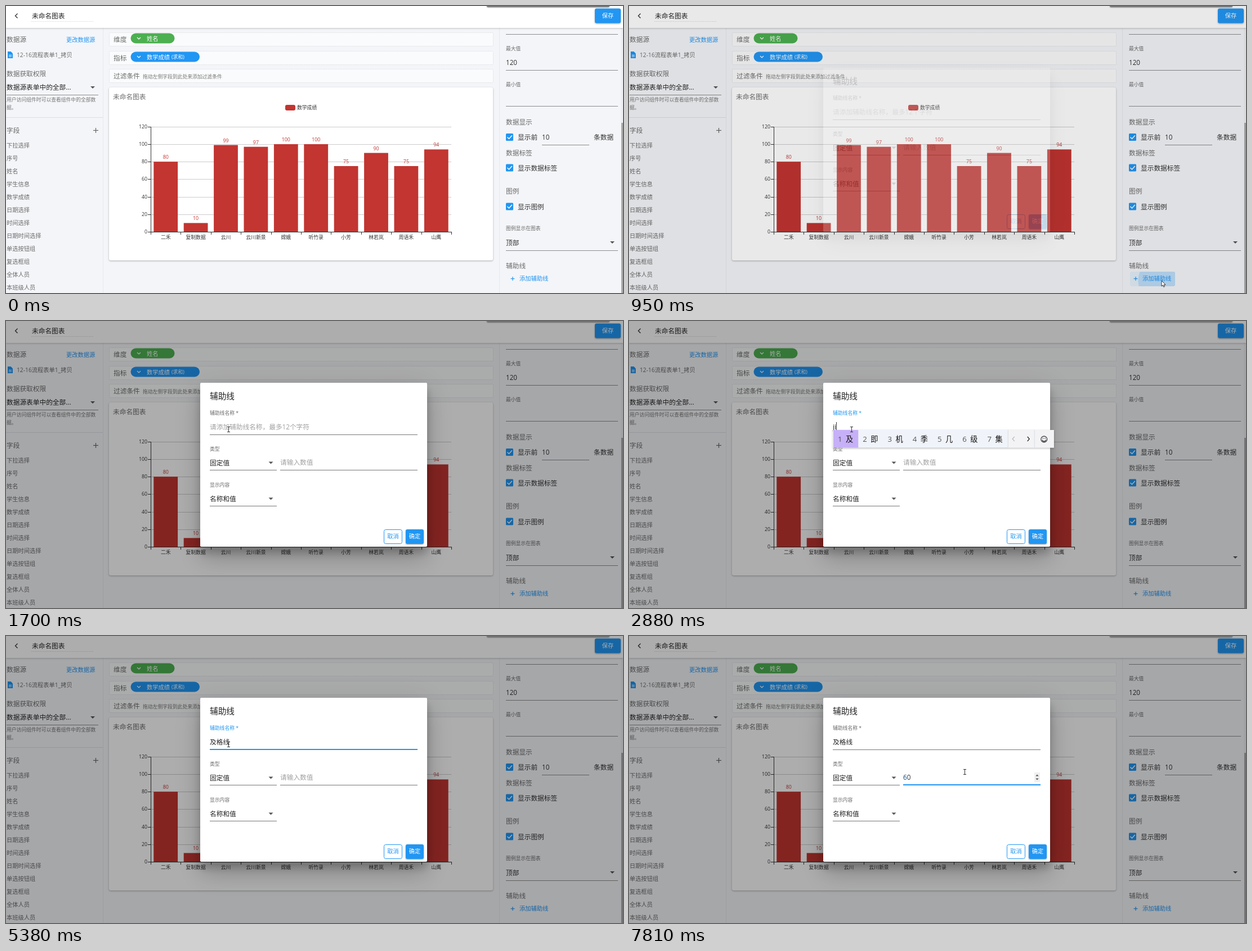
These frames come from a looping animation (1096 px wide and 511 px high, 8000 ms). An HTML page with a canvas:

```html
<!DOCTYPE html>
<html lang="zh-CN">
<head>
<meta charset="utf-8">
<title>图表编辑</title>
<style>
  html, body { margin: 0; width: 100%; height: 100%; overflow: hidden; background: #f4f5f8; }
  canvas { display: block; }
</style>
</head>
<body>
<canvas id="stage" width="1096" height="511"></canvas>
<script>
const LOOP = 8000, W = 1096, H = 511;
const BLUE = '#2196f3', RED = '#c23531', INK = '#333', GREY = '#6b6b6b', LINE = '#8c8c8c';
const SMALL = 8.8, MID = 10.25, BIG = 11.7;
const FONT = '"Open Sans", "Noto Sans CJK SC", "Noto Sans CJK", sans-serif';

const main = document.getElementById('stage').getContext('2d');
const layerCanvas = Object.assign(document.createElement('canvas'), { width: W, height: H });
const layer = layerCanvas.getContext('2d');
let g = main;

const clamp = v => Math.max(0, Math.min(1, v));
const span = (t, a, b) => clamp((t - a) / (b - a));
const mix = (a, b, k) => a + (b - a) * k;
const smooth = k => k * k * (3 - 2 * k);

// Text is placed by its vertical centre.
function text(str, x, cy, size, color = GREY, align = 'left', weight = 400) {
  g.font = `${weight} ${size}px ${FONT}`;
  g.textAlign = align;
  g.fillStyle = color;
  g.fillText(str, x, cy + size * 0.37);
}
function textWidth(str) {
  g.font = `400 ${BIG}px ${FONT}`;
  return g.measureText(str).width;
}
function rect(x, y, w, h, color) {
  g.fillStyle = color;
  g.fillRect(x, y, w, h);
}
function round(x, y, w, h, r, fill, stroke) {
  g.beginPath();
  g.roundRect(x, y, w, h, r);
  if (fill) { g.fillStyle = fill; g.fill(); }
  if (stroke) { g.strokeStyle = stroke; g.lineWidth = 1; g.stroke(); }
}
function raised(x, y, w, h, r, fill, shadows) {
  g.save();
  for (const [dy, blur, color] of shadows) {
    g.shadowOffsetY = dy;
    g.shadowBlur = blur;
    g.shadowColor = color;
    round(x, y, w, h, r, fill);
  }
  g.restore();
}
function path(points, color, width) {
  g.beginPath();
  points.forEach(([x, y], i) => i ? g.lineTo(x, y) : g.moveTo(x, y));
  if (width) { g.strokeStyle = color; g.lineWidth = width; g.stroke(); }
  else { g.closePath(); g.fillStyle = color; g.fill(); }
}
const rule = (x1, x2, y, color = LINE) => rect(x1, y, x2 - x1, 1, color);
const arrow = (x, y, h = 4, w = 4) =>
  path([[x - w, y - h / 2], [x + w, y - h / 2], [x, y + h / 2]], '#555');
function plus(x, y, r, color) {
  path([[x - r, y], [x + r, y]], color, 1.2);
  path([[x, y - r], [x, y + r]], color, 1.2);
}
function checkbox(cy, label) {
  round(888, cy - 6.5, 13, 13, 1.5, BLUE);
  path([[890.5, cy], [893.5, cy + 3], [898.8, cy - 3]], '#fff', 1.5);
  text(label, 909, cy + 0.5, BIG, INK);
}

function drawHeader() {
  raised(0, -4, W, 43, 0, '#fff', [[1, 3, 'rgba(0,0,0,.22)']]);
  path([[20.5, 13.5], [16.5, 17.5], [20.5, 21.5]], INK, 1.4);
  text('未命名图表', 46, 18, BIG, '#222');
  g.setLineDash([2, 1]);
  path([[45, 27.5], [156, 27.5]], '#e0e0e0', 1);
  g.setLineDash([]);
  raised(1046, 4.5, 46, 26, 3, BLUE, [[1, 3, 'rgba(0,0,0,.35)']]);
  text('保存', 1069, 17.5, MID, '#fff', 'center', 500);
}

function drawLeft() {
  rect(172, 39, 1, H, '#e6e8ec');
  text('数据源', 1, 60, BIG);
  text('更改数据源', 107, 60, MID, BLUE);
  path([[3, 81], [8.5, 81], [12, 84.5], [12, 93], [3, 93]], BLUE);
  rect(5, 87, 5, 1, '#fff');
  rect(5, 89.5, 5, 1, '#fff');
  text('12-16流程表单1_拷贝', 19, 87, MID);
  text('数据获取权限', 1, 120.5, BIG);
  text('数据源表单中的全部...', 1, 144.5, BIG, '#222');
  arrow(154, 145);
  rule(1, 164, 158);
  text('用户访问组件时可以查看组件中的全部数', 1, 166.5, SMALL, '#777');
  text('据。', 1, 180.5, SMALL, '#777');
  rule(0, 172, 198, '#dcdee2');
  text('字段', 1, 221.5, BIG);
  plus(159.5, 221.5, 4.5, '#666');
  ['下拉选择', '序号', '姓名', '学生信息', '数学成绩', '日期选择', '时间选择', '日期时间选择',
   '单选按钮组', '复选框组', '全体人员', '本班级人员']
    .forEach((name, i) => text(name, 1, 247.8 + 23.03 * i, MID));
}

function pill(y, w, color, label) {
  round(221.5, y - 0.5, w, 18, 9, color);
  path([[233, y + 7], [236, y + 10], [239, y + 7]], '#fff', 1.2);
  text(label, 250, y + 8.8, MID, '#fff', 'left', 500);
}

function drawRows() {
  ['维度', '指标', '过滤条件'].forEach((label, i) => {
    const y = 47 + 32.7 * i;
    g.setLineDash([2, 1]);
    round(183.5, Math.round(y) + 0.5, 682, 24, 1, '#fafbfc', '#e2e3e6');
    g.setLineDash([]);
    text(label, 191, y + 12.7, BIG);
  });
  pill(49, 78, '#4caf50', '姓名');
  pill(82, 122.5, BLUE, '数学成绩');
  text('(求和)', 294, 91, SMALL, '#fff', 'left', 500);
  text('拖动左侧字段到此处来添加过滤条件', 243, 125.5, SMALL, '#777');
}

function drawChart() {
  raised(183, 145, 682, 308, 3, '#fff', [[1, 3, 'rgba(0,0,0,.3)']]);
  text('未命名图表', 190, 162, BIG);
  round(496, 176, 18, 10, 3, RED);
  text('数学成绩', 517, 180.5, SMALL, INK);

  const left = 257, base = 402, unit = 1.56, step = 53.4;
  for (let v = 0; v <= 120; v += 20) {
    const y = Math.round(base - v * unit);
    if (v) rule(left, 791, y, '#ccc');
    rule(left - 5, left, y, INK);
    text(v, 251, y, SMALL, INK, 'right');
  }
  const bars = [['二禾', 80], ['复制数据', 10], ['云川', 99], ['云川新景', 97], ['嫦娥', 100],
    ['听竹录', 100], ['小芳', 75], ['林若岚', 90], ['周语禾', 75], ['山鹰', 94]];
  bars.forEach(([name, v], i) => {
    const mid = left + step * (i + 0.5);
    const top = base - v * unit;
    rect(mid - 21.4, top, 42.8, v * unit, RED);
    text(v, mid, top - 8.3, SMALL, RED, 'center');
    text(name, mid, 411.5, SMALL, INK, 'center');
  });
  rect(left, 215, 1, 188, INK);
  rule(left, 791, base, INK);
  for (let i = 0; i <= 10; i++) rect(Math.round(left + step * i), base, 1, 5, INK);
}

function drawRight(t, q) {
  rect(876, 39, 1, H, '#e6e8ec');
  rule(888, 1087, 50);
  text('最大值', 888, 76, SMALL);
  text('120', 888, 100.5, BIG, INK);
  rule(888, 1087, 114);
  text('最小值', 888, 140, SMALL);
  rule(888, 1087, 178);
  text('数据显示', 888, 206.5, BIG);
  checkbox(233.5, '显示前');
  text('10', 952, 234, BIG, INK);
  rule(952, 1036, 247);
  text('条数据', 1044, 234, BIG, INK);
  text('数据标签', 888, 261.5, BIG);
  checkbox(288, '显示数据标签');
  text('图例', 888, 330, BIG);
  checkbox(357, '显示图例');
  text('图例显示在图表', 888, 396, SMALL);
  text('顶部', 888, 421.5, BIG, INK);
  arrow(1077, 421);
  rule(888, 1087, 435);
  text('辅助线', 888, 462.5, BIG);
  drawAddButton(t, q);
  rect(1092, 39, 4, H, '#eceef1');
  rect(1093, 208, 3, H, '#a8a8a8');
}

function drawAddButton(t, q) {
  if (t >= 710 && t < 1240) {
    round(890, 473, 80, 26, 3, 'rgba(33,150,243,.08)');
    if (q > 860) {
      g.save();
      g.clip();
      g.beginPath();
      g.arc(946, 489, mix(0, 75, span(q, 850, 1025)), 0, 7);
      g.fillStyle = `rgba(33,150,243,${0.2 * (1 - span(q, 960, 1200))})`;
      g.fill();
      g.restore();
    }
  }
  plus(900, 485.5, 3.5, BLUE);
  text('添加辅助线', 912, 485.5, MID, BLUE);
}

// Input method steps: start time, composed letters, candidates.
const typing = [
  [2730, 'j', '就 级 将 及 叫 家 加'],
  [2810, 'ji', '及 即 机 季 几 级 集'],
  [3430, "ji'g", '几个 及格 机构 技工 交给 价格 结果'],
  [3500, "ji'ge", '及格 几个 鸡哥 寄个 吉格 基哥 集个'],
  [3810, "ji'ge'x", '及格线 及格性 几个小 几个 及格 鸡哥 寄个'],
  [3890, "ji'ge'xi", '及格系 几个系 几个 及格 鸡哥 寄个 吉格'],
  [4040, "ji'ge'xia", '及格下 几个 及格 鸡哥 寄个 吉格 基哥'],
  [4130, "ji'ge'xian", '及格线 几个 及格 鸡哥 寄个 吉格 基哥'],
  [4450, '及格线', '']
];

function drawCandidates(words) {
  const cell = w => 31.1 + 13.15 * w.length;
  const end = 363 + words.reduce((sum, w) => sum + cell(w), 0);
  raised(362, 194, end - 280, 31.5, 0, '#f0f4fa', [[1, 3, 'rgba(0,0,0,.25)']]);
  rect(end, 194, 82, 31.5, '#f3f3f5');
  rect(363, 194, cell(words[0]), 31.5, '#c6b0f8');
  let x = 363;
  words.forEach((word, i) => {
    text(i + 1, x + 8, 210.5, 13.2, '#555');
    text(word, x + 22, 210.5, 13.2, '#111');
    x += cell(word);
  });
  rect(end, 194, 1, 31.5, '#dadbe0');
  rect(end + 47, 194, 1, 31.5, '#dadbe0');
  path([[end + 12, 206], [end + 8.5, 210], [end + 12, 214]], '#aaa', 1.1);
  path([[end + 35, 206], [end + 38.5, 210], [end + 35, 214]], '#222', 1.2);
  const cx = end + 64.5, cy = 210.5;
  g.beginPath();
  g.arc(cx, cy, 5.4, 0, 7);
  g.moveTo(cx + 2.8, cy + 1);
  g.arc(cx, cy + 1, 2.8, 0, Math.PI);
  g.strokeStyle = '#222';
  g.lineWidth = 1.1;
  g.stroke();
  rect(cx - 2.5, cy - 2.5, 1.4, 1.4, '#222');
  rect(cx + 1.2, cy - 2.5, 1.4, 1.4, '#222');
}

function focusLine(x1, x2, y, k) {
  const mid = (x1 + x2) / 2, half = (x2 - x1) / 2 * k;
  rect(mid - half, y, half * 2, 2, BLUE);
}
const caret = (x, y) => rect(Math.round(x), y, 1, 16, INK);
function select(label, value, cy) {
  text(label, 362, cy - 24, SMALL);
  text(value, 362, cy + 0.5, BIG, '#222');
  arrow(470.5, cy + 0.5);
  rule(362, 481, cy + 13, '#777');
}

function drawNameField(t) {
  const focused = t >= 1720 && t < 5850;
  const [, value, words] = typing.filter(([at]) => t >= at).pop() || [0, '', ''];
  text('辅助线名称 *', 362, 164, SMALL, focused ? BLUE : GREY);
  if (value) text(value, 362, 188.5, BIG, '#222');
  else text('请添加辅助线名称，最多12个字符', 362, 188.5, BIG, '#a0a0a0');
  rule(362, 731, 202, '#777');
  if (focused) {
    focusLine(362, 731, 201, span(t, 1720, 1950));
    const lit = t < 2250 || (t >= 2730 && t < 5000) || t >= 5530;
    if (lit) caret(362 + textWidth(value), 180);
  }
  return words && words.split(' ');
}

function drawValueField(t) {
  const typed = t >= 7250 ? '60' : t >= 7100 ? '6' : '';
  if (typed) {
    text(typed, 487, 252, BIG, INK);
    text('6', 487, 252, BIG, '#4c86b8');
  } else text('请输入数值', 487, 252, BIG, '#a0a0a0');
  rule(487, 731, 265, '#777');
  if (t >= 5600) {
    rect(720, 243, 10, 17, '#efefef');
    arrow(725, 248, -3, 2.7);
    arrow(725, 255, 3, 2.7);
  }
  if (t < 5850) return;
  focusLine(487, 731, 264, span(t, 5850, 6080));
  const lit = t < 6390 || (t >= 6930 && t < 7810);
  if (lit) caret(487 + textWidth(typed), 243);
  if (t >= 5930 && t < 7100) {
    raised(487, 265, 243.5, 54.5, 3, '#fff', [[4, 6, 'rgba(0,0,0,.4)']]);
    text('81', 496, 281, SMALL, '#222');
    text('张', 496, 305, SMALL, '#222');
  }
}

function drawDialog(t) {
  raised(345, 110, 403, 292, 3, '#fff', [
    [11, 15, 'rgba(0,0,0,.2)'], [24, 40, 'rgba(0,0,0,.14)'], [9, 50, 'rgba(0,0,0,.12)']]);
  text('辅助线', 362, 133.5, 14.65, '#222');
  const words = drawNameField(t);
  select('类型', '固定值', 252);
  select('显示内容', '名称和值', 316);
  drawValueField(t);
  round(671.5, 371.5, 32, 25, 3, '#fff', BLUE);
  text('取消', 687.5, 383.5, MID, BLUE, 'center', 500);
  raised(710, 371, 32, 26, 3, BLUE, [[1, 3, 'rgba(0,0,0,.35)']]);
  text('确定', 726, 383.5, MID, '#fff', 'center', 500);
  if (words) drawCandidates(words);
}

// Pointer legs: start, end, from, to.
const legs = [
  [0, 550, [1006, 508], [946, 489]],
  [1160, 1640, [946, 489], [395, 193]],
  [5380, 5700, [395, 193], [596, 242]]
];
function drawPointer(t, q) {
  if (t < 70) return;
  const [a, b, from, to] = legs.filter(([at]) => t >= at).pop();
  const k = smooth(span(q, a, b));
  const x = Math.round(mix(from[0], to[0], k)), y = Math.round(mix(from[1], to[1], k));
  const inName = x > 362 && x < 731 && y > 178 && y < 203;
  const inValue = x > 487 && x < 731 && y > 234 && y < 266;
  if (t > 1160 && (inName || inValue)) {
    rect(x, y - 4, 1, 8, INK);
    rect(x - 2, y - 5, 5, 1, INK);
    rect(x - 2, y + 4, 5, 1, INK);
    return;
  }
  const shape = [[0, 0], [0, 10], [2.3, 8], [3.8, 11.3], [5.4, 10.6], [4, 7.4], [7, 7.2]]
    .map(([dx, dy]) => [x + dx, y + dy]);
  path(shape, '#fff');
  path([...shape, shape[0]], '#222', 0.9);
}

function draw(t) {
  // Motion advances in short steps, like a screen recording.
  const q = t - (t - 947 + 73 * 20) % 73;
  g = main;
  rect(0, 0, W, H, '#f4f5f8');
  drawLeft();
  drawRows();
  drawChart();
  drawRight(t, q);
  drawHeader();

  const shade = 0.32 * (1 - (1 - span(q, 932, 1232)) ** 6);
  rect(0, 0, W, H, `rgba(0,0,0,${shade})`);
  const opacity = span(q, 928, 1032);
  if (opacity) {
    g = layer;
    g.clearRect(0, 0, W, H);
    drawDialog(t);
    g = main;
    g.globalAlpha = opacity;
    g.drawImage(layerCanvas, 0, 0);
    g.globalAlpha = 1;
  }
  raised(854, -4, 218, 5.5, 2, '#777', [[1, 2, 'rgba(0,0,0,.5)']]);
  drawPointer(t, q);
}

function frame() {
  draw(performance.now() % LOOP);
  requestAnimationFrame(frame);
}
frame();
</script>
</body>
</html>
```
